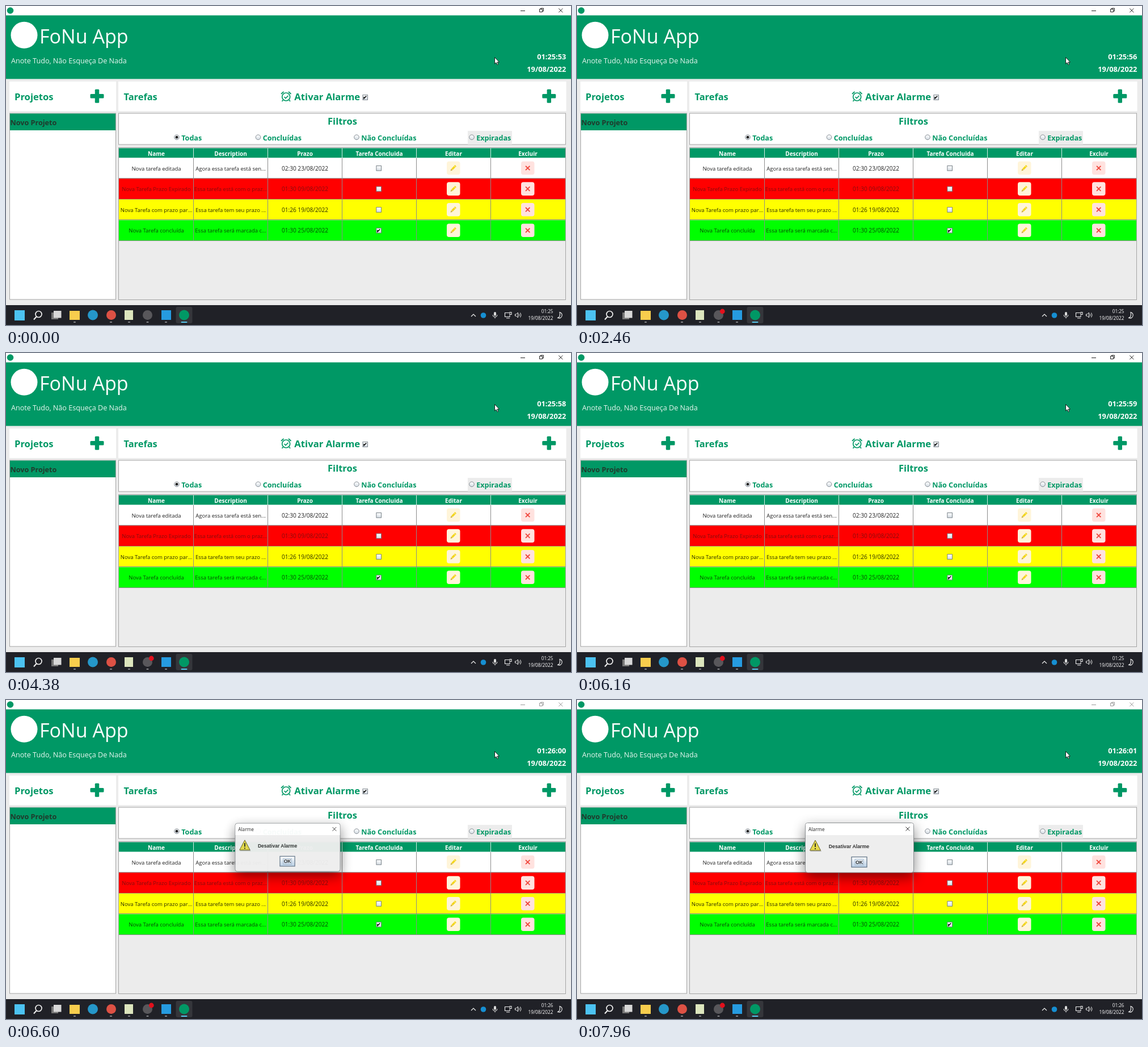
Recreate the animation shown at these times as an HTML page. Size 996 px wide and 562 px high, loop 7.99 s.

```html
<!DOCTYPE html>
<html lang="pt">
<head>
<meta charset="utf-8">
<style>
html, body { margin: 0; width: 100%; height: 100%; overflow: hidden; }
svg { display: block; width: 100vw; height: 100vh; font-family: "Open Sans", "Noto Sans", sans-serif; }
.b { font-weight: 700; }
.m { text-anchor: middle; }
.e { text-anchor: end; }
#dialog { filter: drop-shadow(0 8px 11px rgba(0,0,0,.48)); }
</style>
</head>
<body>
<svg id="stage" viewBox="0 0 996 562"></svg>
<script>
const GREEN = '#009865', LOOP = 7990;
const rect = (x, y, w, h, fill, more = '') => `<rect x="${x}" y="${y}" width="${w}" height="${h}" fill="${fill}" ${more}/>`;
const circle = (x, y, r, fill, more = '') => `<circle cx="${x}" cy="${y}" r="${r}" fill="${fill}" ${more}/>`;
const text = (s, x, y, size, fill, cls = '', more = '') =>
  `<text x="${x}" y="${y}" font-size="${size}" fill="${fill}" class="${cls}" ${more}>${s}</text>`;
const path = (d, stroke, width = 1, fill = 'none', more = '') =>
  `<path d="${d}" stroke="${stroke}" stroke-width="${width}" fill="${fill}" ${more}/>`;
const frame = (x, y, w, h, fill) => rect(x + .5, y + .5, w - 1, h - 1, fill, 'stroke="#a4a4a4"');
const plus = (x, y) => rect(x - 12, y - 3.7, 24, 7.4, GREEN, 'rx="1.5"') + rect(x - 3.7, y - 12, 7.4, 24, GREEN, 'rx="1.5"');
const check = (x, y, on) => rect(x - 4.3, y - 4.3, 8.6, 8.6, 'url(#soft)', 'stroke="#6c757d" stroke-width=".9"') +
  (on ? path(`M${x - 2.3} ${y - 1}v3l4.4 -4.4`, '#111', 1.5) : '');
const radio = (x, label, on) => circle(x, 231.2, 4.3, 'url(#soft)', 'stroke="#7a828a" stroke-width=".9"') +
  (on ? circle(x, 231.2, 2.4, '#222') : '') + text(label, x + 8.2, 237, 12.6, GREEN, 'b');

function titleBar() {
  return rect(0, 0, 996, 17, '#fff') + circle(7.5, 8, 5.8, GREEN) +
    `<g id="controls">${path('M907 8.5h8M940.5 5.5h5v5h-5zM942.5 5.5v-1.5h5v5h-2M974.3 4.3l7 7M981.3 4.3l-7 7', 'currentColor')}</g>`;
}

function header() {
  return rect(0, 16.5, 996, 112, GREEN) + circle(32, 51.3, 23.5, '#fff') +
    text('FoNu App', 59, 66, 34, '#fff') +
    text('Anote Tudo, Não Esqueça De Nada', 9, 100.6, 12.6, '#e9f7f1') +
    text('', 987.3, 93.7, 12.8, '#fff', 'b e', 'id="clock"') +
    text('19/08/2022', 987.3, 116.3, 12.8, '#fff', 'b e');
}

function panels() {
  const alarm = circle(493.7, 160, 7, 'none', `stroke="${GREEN}" stroke-width="1.7"`) +
    path('M485 155l4.5-4M502.5 155l-4.5-4M488.5 165.5l-2 2.5M499 165.5l2 2.5M490.5 160l2.5 2.5 4.5-4.5', GREEN, 1.7);
  return rect(6, 133, 188, 52, '#fff') + text('Projetos', 15, 166, 16.6, GREEN, 'b') + plus(160.5, 158.8) +
    rect(198, 133, 789.5, 52, '#fff') + text('Tarefas', 207.5, 166, 16.4, GREEN, 'b') + alarm +
    text('Ativar Alarme', 508.3, 166, 16.7, GREEN, 'b') + check(633.2, 161, true) + plus(957.3, 158.8) +
    frame(6, 188.5, 188, 329, '#fff') + rect(7, 189.5, 186, 29.5, GREEN) +
    text('Novo Projeto', 7.5, 210, 12.6, '#20392c', 'b') +
    frame(198, 188.5, 789, 56, '#fff') + text('Filtros', 593, 208.8, 16.5, GREEN, 'b m') +
    rect(814, 220, 78, 24, '#ececec') + radio(301, 'Todas', true) + radio(444.5, 'Concluídas') +
    radio(618, 'Não Concluídas') + radio(821, 'Expiradas');
}

function table() {
  const col = i => 199.5 + 131 * i, mid = i => col(i) + 65.5;
  const rows = [
    ['#fff', '#222', 'Nova tarefa editada', 'Agora essa tarefa está sen...', '02:30 23/08/2022'],
    ['#f00', '#850d0d', 'Nova Tarefa Prazo Expirado', 'Essa tarefa está com o praz...', '01:30 09/08/2022'],
    ['#ff0', '#2c2c00', 'Nova Tarefa com prazo par...', 'Essa tarefa tem seu prazo ...', '01:26 19/08/2022'],
    ['#0f0', '#064806', 'Nova Tarefa concluída', 'Essa tarefa será marcada c...', '01:30 25/08/2022']
  ];
  let out = frame(198, 249, 789, 269, '#ececec') + rect(199, 250.5, 787, 17, GREEN);
  ['Name', 'Description', 'Prazo', 'Tarefa Concluida', 'Editar', 'Excluir'].forEach((s, i) => {
    out += text(s, mid(i), 263.8, 10, '#fff', 'b m');
    if (i) out += path(`M${col(i)} 250.5v17`, '#d8eee5');
  });
  rows.forEach(([bg, ink, name, about, due], i) => {
    const y = 267.6 + 36.6 * i, c = y + 17.9;
    out += rect(199, y, 787, 36.6, bg);
    out += text(name, mid(0), c + 4, 9.5, ink, 'm') + text(about, mid(1), c + 4, 9.5, ink, 'm') +
      text(due, mid(2), c + 4, 10.15, ink, 'm') + check(657.2, c + .3, i == 3);
    out += rect(777, c - 11.8, 23.5, 23.6, '#fff5da', 'rx="4"') +
      `<g transform="translate(788.5 ${c}) rotate(45)">${rect(-1.7, -6, 3.4, 9, '#f3d61c')}${path('M-1.7 3.5h3.4L0 7z', 'none', 0, '#c9a83a')}${path('M-1.7-3.7h3.4', '#fff5da', .8)}</g>`;
    out += rect(908, c - 11.8, 23.5, 23.6, '#ffe2df', 'rx="4"') +
      path(`M916 ${c - 3.7}l7.4 7.4m0-7.4l-7.4 7.4`, '#f0483e', 1.9);
    out += path(`M199 ${Math.round(y + 35.5) + .5}H986`, '#8c8c8c');
  });
  for (let i = 1; i < 6; i++) out += path(`M${col(i)} 268V414`, '#8c8c8c');
  return out;
}

function taskbar() {
  let out = rect(0, 527, 996, 35, '#202127') + rect(299.5, 530, 29, 29, '#35363b', 'rx="3"');
  out += rect(15, 536, 18, 18, '#4cc2f1') +
    circle(57.5, 543, 5.5, 'none', 'stroke="#eee" stroke-width="1.7"') + path('M53.5 547.5l-4.5 5', '#eee', 2) +
    rect(80, 540, 12, 12, '#777') + rect(84, 537, 13.5, 12.5, '#d8d8d8');
  out += rect(112, 537, 18, 16, '#f7cd4d') + circle(153, 544.5, 9, '#2597c9') + circle(185.5, 544.5, 8.5, '#dd5144') +
    rect(209, 536, 15, 17, '#dce5bd') + circle(249.5, 544.5, 8.5, '#58575b') + rect(274, 536, 17, 17, '#269be0') +
    circle(314, 544.5, 9, GREEN);
  [121, 185, 217, 249.5, 282].forEach(x => out += rect(x - 2, 556, 4, 1.8, '#96979b', 'rx=".9"'));
  out += rect(308.5, 556, 11, 2, '#55c6ee', 'rx="1"') + circle(256.3, 538, 4.4, '#e3101c', 'id="rec"');
  out += path('M820 547l4-4 4 4', '#eee', 1.2) + circle(841.5, 545, 4.8, '#168fd2') +
    rect(860, 539, 4, 7, '#ddd', 'rx="2"') + path('M858 544q0 4 4 4t4-4M862 548v2.5', '#ddd') +
    path('M887 540.5h-7.5v7h8.5v-3M882 550h6M888 539.5h3v4h-3z', '#eee', 1.1) +
    path('M897.5 543h2l3-3v9l-3-3h-2zM904.5 542.5q1.5 2 0 4M906.5 540.5q3 4 0 8', '#eee');
  return out + text('', 964.5, 541.3, 8.1, '#fff', 'e', 'id="time"') + text('19/08/2022', 964.5, 553, 8.3, '#fff', 'e') +
    path('M976 539.5q5 1.5 4 6.5t-8 3.5q6-1 4-10z', '#eee', 1.1);
}

function dialog() {
  const arial = 'font-family="Liberation Sans, Arial, sans-serif"';
  return `<g id="dialog">` + rect(402.5, 216.5, 191, 87.5, '#eee', 'rx="4" stroke="#8d9194"') +
    path('M403 238v-17q0-4 4-4h182q4 0 4 4v17z', 'none', 0, '#fff') +
    text('Alarme', 408, 230.7, 8.5, '#222') + path('M579.5 223.5l7 7m0-7l-7 7', '#333') +
    path('M421.5 249l9.5 18h-20z', 'none', 0, '#bbb') +
    path('M420 247l9.5 18h-19z', '#6b6428', 1, '#e5d94a', 'stroke-linejoin="round"') +
    path('M420 252.5v6.5M420 261v2', '#222', 1.8) +
    text('Desativar Alarme', 443.7, 261, 8.8, '#333', 'b', arial) +
    rect(484, 276.5, 27, 18, 'url(#metal)', 'stroke="#66788a" stroke-width="1.3"') +
    rect(490, 280.5, 15, 10.5, 'none', 'stroke="#a3b8cc"') +
    text('OK', 497.5, 289, 8.8, '#333', 'b m', arial) + '</g>';
}

const gradient = (id, a, b) => `<linearGradient id="${id}" x2="0" y2="1"><stop stop-color="${a}"/><stop offset="1" stop-color="${b}"/></linearGradient>`;
const cursor = path('M861.5 90.5v11.5l2.6-2.4 1.9 4 1.8-.8-1.8-3.9h3.5z', '#111', .9, '#fff');
const $ = id => document.getElementById(id);
$('stage').innerHTML = `<defs>${gradient('soft', '#fff', '#d5dde4')}${gradient('metal', '#fff', '#b8cfe5')}</defs>` +
  rect(0, 0, 996, 562, '#ececec') + titleBar() + header() + panels() + table() + taskbar() + dialog() + cursor;

// times in ms at which the header clock advances
const TICKS = [650, 1560, 2460, 3360, 4320, 5270, 6250, 7230];
const OPEN = 6480, OPENING = 270;

function draw(now) {
  const t = now % LOOP;
  const sec = 53 + TICKS.filter(tick => t >= tick).length;
  $('clock').textContent = `01:${25 + Math.floor(sec / 60)}:${String(sec % 60).padStart(2, '0')}`;
  $('time').textContent = t < 6370 ? '01:25' : '01:26';
  $('rec').style.display = t < 30 ? 'none' : '';
  $('controls').style.color = t < OPEN ? '#222' : '#999';

  const u = Math.min(1, Math.max(0, (t - OPEN) / OPENING));
  const ease = 1 - (1 - u) ** 2, scale = .9 + .1 * ease;
  const box = $('dialog');
  box.style.display = u > 0 ? '' : 'none';
  box.style.opacity = Math.min(1, 1.4 * ease);
  box.setAttribute('transform', `translate(${498 - 48 * (1 - scale)} ${260 - 20 * (1 - scale)}) scale(${scale}) translate(-498 -260)`);
}

let start;
function loop(now) {
  start ??= now;
  draw(now - start);
  requestAnimationFrame(loop);
}
draw(0);
requestAnimationFrame(loop);
</script>
</body>
</html>
```
